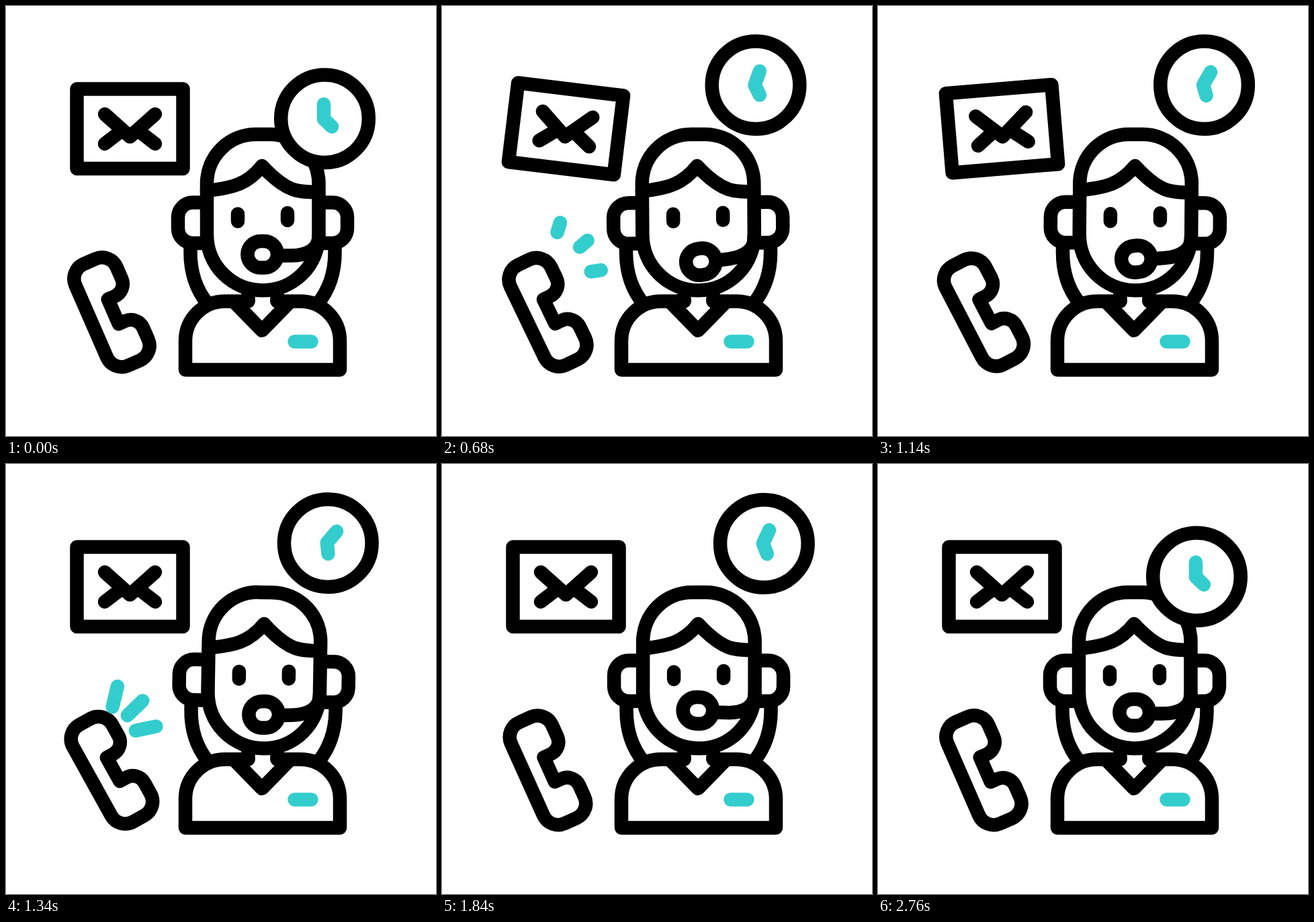
Animation, 640 px wide and 640 px high, one loop 3.2 s. Source, as an HTML page:

```html
<!DOCTYPE html>
<html lang="en">
<head>
<meta charset="utf-8">
<title>Customer support</title>
<style>
  html, body { margin: 0; width: 100%; height: 100%; overflow: hidden; background: #fff; }
  svg { display: block; width: 100%; height: 100%; }
  svg * { stroke-linecap: round; stroke-linejoin: round; }
  .ink { fill: #fff; stroke: #000; stroke-width: 20.5; }
  .line { fill: none; }
  .teal { fill: none; stroke: #33cdcd; stroke-width: 20.5; }
</style>
</head>
<body>
<svg viewBox="0 0 640 640">
  <g id="mail" class="ink">
    <rect x="105.5" y="123.5" width="158" height="118.5"/>
    <path class="line" d="M147 161L184.5 194.5L222 161M147 205L171 186.5M222 205L198 186.5"/>
  </g>

  <g id="phone">
    <path class="ink" transform="translate(157 456) rotate(-23.6)"
      d="M3-20H14A20 20 0 0 0 34-40V-58.5A24 24 0 0 0 10-82.5H-9A24 24 0 0 0-33-58.5V58.5A24 24 0 0 0-9 82.5H10A24 24 0 0 0 34 58.5V40A20 20 0 0 0 14 20H3Z"/>
    <g id="rays" class="teal" transform="translate(152.5 405.5)"></g>
  </g>

  <path id="hair" class="ink line" d="M274.5 355V367C274.5 400 284.5 424 300 443M489.5 355V367C489.5 400 479.5 424 464 443"/>

  <g class="ink">
    <path d="M360.5 439.5H326A59 59 0 0 0 267 498.5V541.5H497V498.5A59 59 0 0 0 438 439.5H403.5"/>
    <path class="line" d="M341 442L381 483L421 442M360.5 424V439.5M403.5 424V439.5"/>
  </g>
  <path class="teal" d="M429.5 499.5H454.5"/>

  <g id="head" class="ink">
    <path d="M299 292.5H278A22 22 0 0 0 256 314.5V331A22 22 0 0 0 278 353H299M465.5 292.5H486A22 22 0 0 1 508 314.5V331A22 22 0 0 1 486 353H465.5"/>
    <path d="M299 340V264A73 73 0 0 1 372 191H392.5A73 73 0 0 1 465.5 264V340A83.25 83.25 0 0 1 299 340Z"/>
    <path class="line" d="M299 275C308 274 322 272.5 338 268C356 263 369.5 252.5 381 238C393 251 411 267 427 273C439 277 452 277 465 277"/>
    <path d="M345 309.5V320.5M419 308V319"/>
    <g id="mic">
      <path class="line" d="M412 371.5H424C448 371.5 465.5 362 465.5 343"/>
      <rect x="359.4" y="350" width="44.6" height="39.6" rx="19.8"/>
    </g>
  </g>

  <g id="clock">
    <circle class="ink" r="65.3"/>
    <path id="hands" class="teal" d="M-1.5-21.5V.5L10.5 12"/>
  </g>
</svg>
<script>
const LOOP = 3200;
const $ = id => document.getElementById(id);
const move = (id, transform) => $(id).setAttribute("transform", transform);

const ramp = (t, from, to) => Math.min(1, Math.max(0, (t - from) / (to - from)));
const ease = (t, from, to) => (1 - Math.cos(Math.PI * ramp(t, from, to))) / 2;

// Swings from pose to pose in eased steps of equal length
const swing = (t, start, step, ...poses) => poses.slice(1).reduce(
  (sum, pose, i) => sum + (pose - poses[i]) * ease(t, start + i * step, start + (i + 1) * step),
  poses[0]);

// Three spokes share one trimmed line
const rays = [0, 1, 2].map(i => {
  const ray = document.createElementNS("http://www.w3.org/2000/svg", "path");
  ray.setAttribute("transform", `rotate(${32.4 * i - 71})`);
  $("rays").append(ray);
  return ray;
});

function drawRays(t) {
  const tail = ease(t, 430, 860), tip = ease(t, 250, 500);
  const visible = tip > 0 && tail < 1;
  const d = visible ? `M${46 + 41 * tail} 0H${46 + 41 * tip}` : "";
  for (const ray of rays) ray.setAttribute("d", d);
}

function draw(t) {
  const mail = swing(t, 200, 363, 0, 13.2, -13.2, 0);
  const phone = swing(t, 300, 230, 0, -8, 0, -8, -2.4, -8, -3.2, 0);
  const head = swing(t, 200, 335, 0, -2.1, 2.1, .3, 2.1, 0);
  const mic = swing(t, 200, 480, 0, 7.7, 4.7, -3.3, 0);
  const sway = swing(t, 350, 415, 0, -8.3, 11.5, -9, 12.5, 0);
  const lift = 50 * (ease(t, 280, 640) - ease(t, 1800, 2300));
  const turn = 50 * (ramp(t, 250, 1540) - ease(t, 1560, 2150));

  move("mail", `rotate(${mail} 184.5 182.75)`);
  move("phone", `rotate(${phone} 157 456)`);
  move("head", `rotate(${head} 381 430)`);
  move("hair", `rotate(${head} 381 430)`);
  move("mic", `rotate(${-mic} 464 345)`);
  move("clock", `translate(${474.5 + sway} ${167.7 - lift})`);
  move("hands", `rotate(${turn - sway * .4})`);
  drawRays(t < 1100 ? t : t - 922);
}

function tick() {
  draw(performance.now() % LOOP);
  requestAnimationFrame(tick);
}
tick();
</script>
</body>
</html>
```
